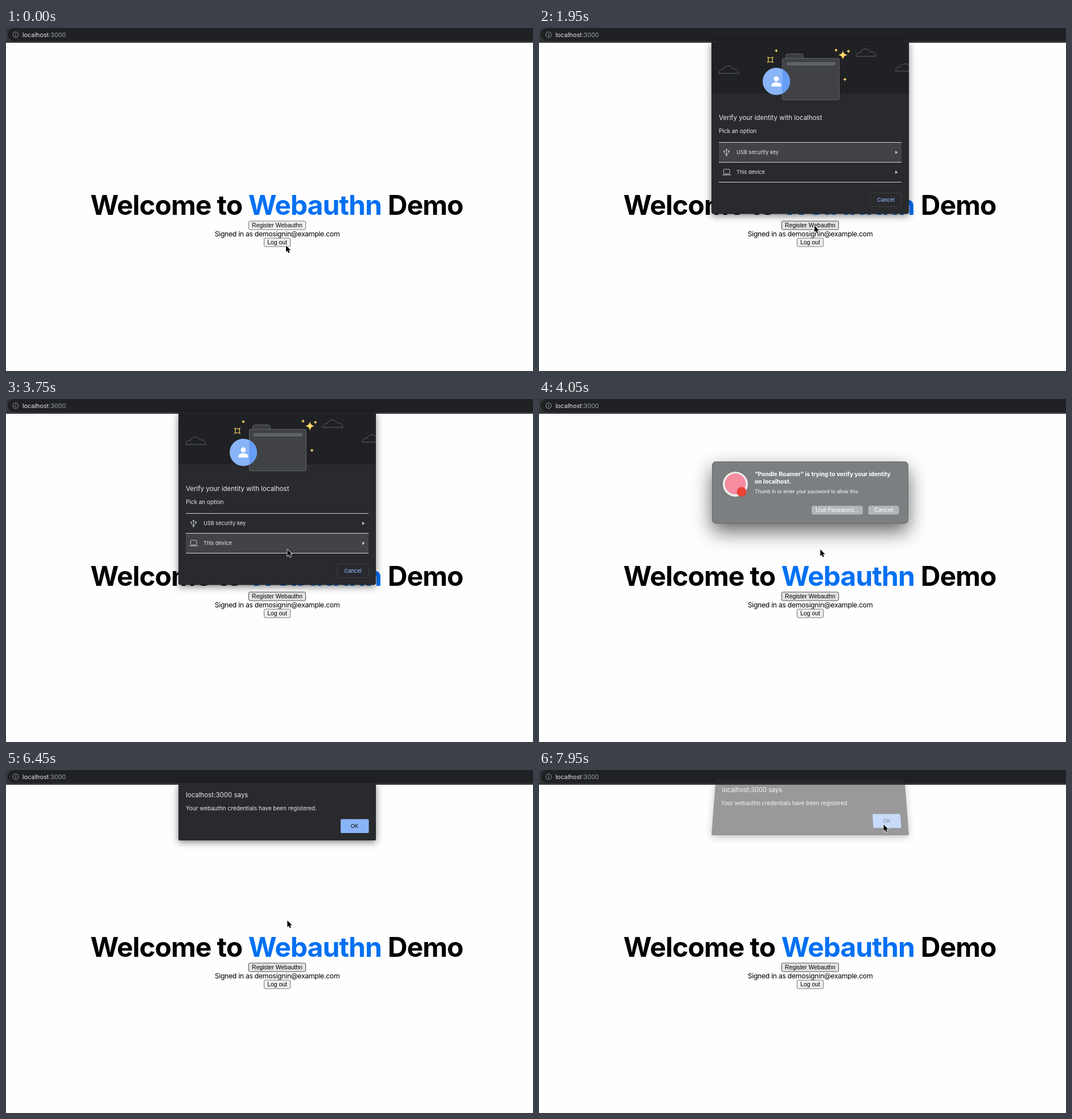
Write an HTML page with a canvas that moves like this. It is 926 px wide and 604 px high and loops after 8 s.

```html
<!DOCTYPE html>
<html lang="en">
<head>
<meta charset="utf-8">
<title>Webauthn Demo</title>
<style>
  html, body { margin: 0; width: 100%; height: 100%; overflow: hidden; background: #fff; }
  canvas { display: block; }
</style>
</head>
<body>
<canvas id="stage" width="926" height="604"></canvas>
<script>
const stage = document.getElementById('stage');
const main = stage.getContext('2d');
const layer = stage.cloneNode().getContext('2d');
let ctx = main;

const LOOP = 8000;
const MID = 476.5;
const UI = 'Inter, Roboto, sans-serif';
const ARIAL = '"Liberation Sans", Arial, sans-serif';

// [start ms, tip x, tip y]
const cursorSteps = [
  [0, 492, 383], [150, 489, 356], [300, 487, 350], [450, 484, 348],
  [2700, 486, 300], [2850, 491.5, 273], [3000, 493, 266], [3150, 494.3, 265],
  [7200, 547, 123], [7350, 561, 98], [7500, 602, 94], [7650, 605, 95], [7800, 605.5, 96]
];

function text(str, x, y, size, color, opt = {}) {
  ctx.font = `${opt.weight || 400} ${size}px ${opt.family || UI}`;
  ctx.letterSpacing = (opt.track || 0) + 'px';
  ctx.textAlign = opt.align || 'left';
  ctx.fillStyle = color;
  ctx.fillText(str, x, y);
}

function box(x, y, w, h, r, fill, stroke) {
  ctx.beginPath();
  ctx.roundRect(x, y, w, h, r);
  if (fill) { ctx.fillStyle = fill; ctx.fill(); }
  if (stroke) { ctx.strokeStyle = stroke; ctx.lineWidth = 1; ctx.stroke(); }
}

function disc(x, y, r, fill) {
  ctx.beginPath();
  ctx.arc(x, y, r, 0, Math.PI * 2);
  ctx.fillStyle = fill;
  ctx.fill();
}

function poly(points, fill) {
  ctx.beginPath();
  points.forEach(([x, y]) => ctx.lineTo(x, y));
  ctx.closePath();
  if (fill) { ctx.fillStyle = fill; ctx.fill(); }
}

function line(path, color, width = 1) {
  ctx.strokeStyle = color;
  ctx.lineWidth = width;
  ctx.stroke(new Path2D(path));
}

function shadow(color, blur, dy) {
  ctx.shadowColor = color;
  ctx.shadowBlur = blur;
  ctx.shadowOffsetY = dy;
}

function noShadow() { shadow('transparent', 0, 0); }

function toolbar() {
  ctx.fillStyle = '#35363a';
  ctx.fillRect(0, 0, 926, 26);
  box(3, 0, 940, 23, 11, '#202124');
  ctx.beginPath();
  ctx.arc(17, 11.7, 4.8, 0, Math.PI * 2);
  ctx.strokeStyle = '#9aa0a6';
  ctx.lineWidth = 1;
  ctx.stroke();
  ctx.fillStyle = '#9aa0a6';
  ctx.fillRect(16.5, 11, 1, 3.4);
  ctx.fillRect(16.5, 9, 1, 1.1);
  text('localhost', 29, 15.5, 10.8, '#e8eaed');
  text(':3000', 29 + ctx.measureText('localhost').width, 15.5, 10.8, '#9aa0a6');
}

function button(label, x, y, w, state) {
  const fill = { idle: '#efefef', hover: '#e3e3e3', active: '#f5f5f5' }[state];
  box(x + .5, y + .5, w - 1, 15, 2, fill, state === 'hover' ? '#4f4f4f' : '#767676');
  text(label, x + w / 2, y + 11.6, 10.4, '#000', { family: ARIAL, align: 'center' });
}

function page(t) {
  ctx.fillStyle = '#fefefe';
  ctx.fillRect(0, 0, 926, 604);
  const title = (word, x, color = '#000') =>
    text(word, x, 329, 48, color, { weight: 700, track: -1, align: 'center' });
  title('Welcome', 254.4);
  title('to', 392.8);
  title('Webauthn', 542.8, '#0070f3');
  title('Demo', 737);
  const register = t < 450 ? 'idle' : t >= 1200 && t < 1350 ? 'active' : 'hover';
  button('Register Webauthn', 426, 339.5, 101, register);
  text('Signed in as demosignin@example.com', MID, 367, 12.24, '#000', { align: 'center', track: -.3 });
  button('Log out', 453, 369.5, 47, t >= 150 && t < 300 ? 'hover' : 'idle');
  toolbar();
}

function cloud(x, y) {
  line(`M${x} ${y + 13}c0-6 4-7 8-7c2-8 14-8 17-1c6 0 10 3 10 8z`, '#5f6368');
}

function sparkle(x, y, r) {
  ctx.beginPath();
  ctx.moveTo(x, y - r);
  for (let i = 1; i <= 4; i++) {
    const a = (i - 1) * Math.PI / 2;
    const mid = a - Math.PI / 4;
    ctx.quadraticCurveTo(x + Math.cos(mid) * r * .18, y + Math.sin(mid) * r * .18,
      x + Math.cos(a) * r, y + Math.sin(a) * r);
  }
  ctx.fillStyle = '#fdd663';
  ctx.fill();
}

function artwork() {
  ctx.save();
  ctx.beginPath();
  ctx.rect(303, 24, 347, 103);
  ctx.clip();
  ctx.fillStyle = '#202124';
  ctx.fillRect(303, 24, 347, 91);
  cloud(316, 67);
  cloud(557, 37);
  cloud(626.5, 63);

  box(433.5, 45.5, 31, 16, 4, '#3c3d40', '#5f6368');
  box(427.5, 53.5, 100, 73, 2, '#414246', '#5f6368');
  box(434.5, 60, 86.5, 6, 3, '#5f6368');

  disc(417, 94, 24, '#8ab4f8');
  ctx.save();
  ctx.beginPath();
  ctx.rect(427.5, 53, 30, 74);
  ctx.clip();
  disc(417, 94, 24, '#669df6');
  ctx.restore();
  disc(417, 89.5, 4.4, '#fff');
  ctx.fillStyle = '#fff';
  ctx.fill(new Path2D('M408.5 103v-2.5c0-3.5 5-5 8.5-5s8.5 1.5 8.5 5v2.5z'));

  [[534, 47.5, 8], [522, 39, 3.3], [543.7, 41, 3.3], [417, 40, 3.3], [537.5, 90.5, 3.5]]
    .forEach(s => sparkle(...s));
  line('M402 51.5q4.5 2 9 0q-2 4.5 0 9q-4.5-2-9 0q2-4.5 0-9z', '#fdd663', 1.2);
  ctx.restore();
}

function usbIcon(x, y) {
  const c = '#bdc1c6';
  line(`M${x} ${y - 4}v9M${x - 4} ${y - 2}v3l4 2.5M${x + 4} ${y - 2.5}v3l-4 2.5`, c);
  poly([[x, y - 7], [x + 2, y - 3.5], [x - 2, y - 3.5]], c);
  disc(x, y + 5, 1.6, c);
  disc(x - 4, y - 2, 1.3, c);
  ctx.fillRect(x + 2.8, y - 3.5, 2.5, 2.5);
}

function laptopIcon() {
  box(324.5, 248.7, 10.5, 8, 1, null, '#bdc1c6');
  ctx.fillStyle = '#bdc1c6';
  ctx.fillRect(322, 258, 15.5, 1.2);
}

function identitySheet(t) {
  shadow('rgba(0,0,0,.5)', 13, 3);
  box(303, 24, 347, 303.5, [0, 0, 4, 4], '#292a2d');
  noShadow();
  artwork();
  text('Verify your identity with localhost', 316, 162, 11.5, '#e8eaed');
  text('Pick an option', 316, 185, 9.95, '#e8eaed');

  ctx.fillStyle = '#424346';
  ctx.fillRect(316, t < 3000 ? 202 : 237, 321, 34);
  ctx.fillStyle = '#d5d6d8';
  for (const y of [201, 236, 271]) ctx.fillRect(316, y, 321, 1);
  usbIcon(329.5, 219);
  laptopIcon();
  text('USB security key', 347, 222, 9.2, '#e8eaed');
  text('This device', 347, 257, 9.2, '#e8eaed');
  for (const y of [219, 254]) poly([[626, y - 3], [630.5, y], [626, y + 3]], '#bdc1c6');

  box(582, 290.5, 55, 24, 3, null, '#3c4043');
  text('Cancel', 609.5, 305.5, 9.2, '#8ab4f8', { weight: 500, align: 'center' });
}

function systemPrompt() {
  shadow('rgba(0,0,0,.6)', 34, 14);
  box(304, 110, 345, 109.5, 7, '#7b7f81');
  noShadow();
  box(304.5, 110.5, 344, 108.5, 7, null, '#66696b');

  disc(345, 150, 22, '#ededed');
  disc(345, 149.5, 18.5, '#f58c9f');
  disc(356, 163.5, 8.5, '#ea4335');

  const bold = { weight: 700 };
  text('“Pondle Roamer” is trying to verify your identity', 379, 136, 10.2, '#fff', bold);
  text('on localhost.', 379, 148.5, 10.2, '#fff', bold);
  text('Thumb In or enter your password to allow this.', 379, 165.5, 8.4, '#fff');

  const push = (label, x, w) => {
    box(x, 188, w, 15.5, 3.5, '#b2b5b7');
    text(label, x + w / 2, 199, 9.9, '#fff', { align: 'center' });
  };
  push('Use Password…', 479, 90);
  push('Cancel', 578.5, 54);
}

// The alert tips back while it opens and closes: narrower at the top and lifted.
function alertBox(lift, taper) {
  const squeeze = y => 1 - taper * (124 - y) / 100;
  const place = ([x, y]) => [MID + (x - MID) * squeeze(y), y - lift];
  const tilted = (str, x, y, size, color, opt) => {
    ctx.save();
    ctx.translate(...place([x, y]));
    ctx.scale(squeeze(y), 1);
    text(str, 0, 0, size, color, opt);
    ctx.restore();
  };
  // Rectangle with cut corners, so that it can be tilted as a polygon.
  const panel = (x, y, w, h, cut, fill) => {
    const r = x + w, b = y + h;
    poly([[x, y + cut], [x + cut, y], [r - cut, y], [r, y + cut],
      [r, b - cut], [r - cut, b], [x + cut, b], [x, b - cut]].map(place), fill);
  };
  shadow('rgba(0,0,0,.5)', 13, 3);
  panel(303, 24, 347, 100, 1.5, '#292a2d');
  noShadow();
  panel(588, 86.5, 49.5, 24.5, 1.2, '#8ab4f8');
  tilted('localhost:3000 says', 316, 48, 11.5, '#e8eaed');
  tilted('Your webauthn credentials have been registered.', 316, 70.5, 9.95, '#e8eaed');
  tilted('OK', 612.5, 102, 9.2, '#202124', { weight: 500, align: 'center' });
}

// Draws on a separate layer, then blends it as a whole.
function faded(alpha, paint) {
  ctx = layer;
  ctx.clearRect(0, 0, 926, 604);
  paint();
  ctx = main;
  ctx.globalAlpha = alpha;
  ctx.drawImage(layer.canvas, 0, 0);
  ctx.globalAlpha = 1;
}

function cursor(t) {
  const [, x, y] = cursorSteps.filter(s => s[0] <= t).pop();
  ctx.save();
  ctx.translate(x, y);
  poly([[0, 0], [0, 11.5], [2.6, 9.2], [4.5, 13.3], [6.5, 12.5], [4.7, 8.4], [8.2, 8.2]]);
  ctx.lineJoin = 'round';
  ctx.strokeStyle = '#fff';
  ctx.lineWidth = 1.6;
  ctx.stroke();
  ctx.fillStyle = '#000';
  ctx.fill();
  ctx.restore();
}

function draw(t) {
  page(t);
  if (t >= 1950 && t < 4050) identitySheet(t);
  else if (t >= 4050 && t < 6000) systemPrompt();
  else if (t >= 7950) faded(.47, () => alertBox(9, .045));
  else if (t >= 6450) alertBox(0, 0);
  else if (t >= 6300) faded(.65, () => alertBox(5, .025));
  cursor(t);
}

const start = performance.now();
function tick() {
  draw((performance.now() - start) % LOOP);
  requestAnimationFrame(tick);
}
tick();
</script>
</body>
</html>
```
